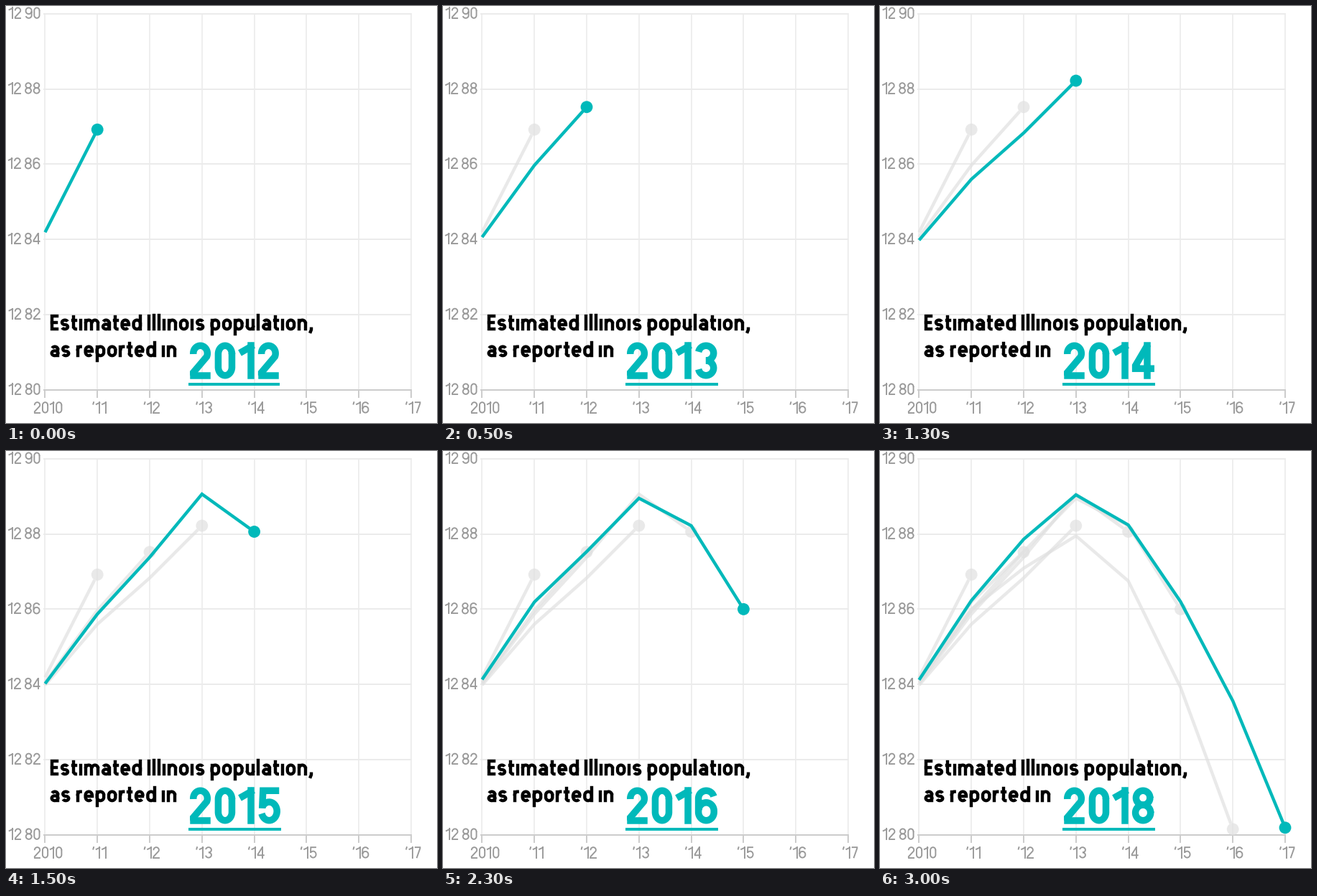
Recreate the animation shown at these times as a matplotlib script. Size 600 px wide and 581 px high, loop 3.5 s.

```python
import numpy as np
import matplotlib.pyplot as plt
from matplotlib.animation import FuncAnimation
from matplotlib.collections import LineCollection
from matplotlib.patches import Circle

W, H, DPI = 600, 581, 100
PX = 72 / DPI
TEAL, GRID, AXIS, LABEL = "#00b9ba", "#ebebeb", "#cccccc", "#999999"
LEFT, STEP_X = 54.4, 72.8
BOTTOM, STEP_Y = 534.8, 104.8
DOT = 8.4

# Population estimates per report, in thousands above 12.80 million
REPORTS = {
    2012: [41.9, 69.2],
    2013: [40.6, 59.7, 75.2],
    2014: [39.8, 56.0, 68.3, 82.2],
    2015: [40.2, 58.7, 73.8, 90.6, 80.6],
    2016: [41.3, 61.9, 75.3, 89.5, 82.2, 60.0],
    2017: [41.5, 60.0, 70.9, 79.5, 67.5, 39.2, 1.5],
    2018: [41.2, 62.3, 78.6, 90.4, 82.4, 62.0, 35.6, 1.9],
}


# Condensed stroke lettering: glyphs live in a unit box, baseline 0, capitals 1

def arc(cx, cy, rx, ry, start, end):
    a = np.radians(np.linspace(start, end, 28))
    return list(zip(cx + rx * np.cos(a), cy + ry * np.sin(a)))


def ring(low, high, r, inset=0):
    rx = 0.5 - inset
    pts = arc(0.5, high - r, rx, r, 0, 180) + arc(0.5, low + r, rx, r, 180, 360)
    return pts + pts[:2]


def stem(x, low, high):
    return [(x, low), (x, high)]


def bar(y, left=0, right=1):
    return [(left, y), (right, y)]


XH = 0.67
BOWL = ring(0, XH, 0.25)
ARCH = arc(0.5, XH - 0.25, 0.5, 0.25, 180, 0)
SIX = (arc(0.5, 0.74, 0.5, 0.26, 15, 180) + arc(0.5, 0.28, 0.5, 0.28, 180, 360)
       + arc(0.5, 0.32, 0.5, 0.28, 0, 170))

# Each glyph: width relative to capital height (0 = one stroke wide), strokes
GLYPHS = {
    " ": (0.13, []),
    ".": (0, [stem(0, 0, 0.01)]),
    ",": (0.24, [[(1, 0.02), (1, -0.05), (0, -0.2)]]),
    "‘": (0.16, [[(1, 1), (0, 0.83)]]),
    "0": (0.56, [ring(0, 1, 0.28)]),
    "1": (0.40, [stem(1, 0, 1), [(0, 0.81), (1, 0.96)]]),
    "2": (0.57, [arc(0.5, 0.74, 0.5, 0.26, 185, -25) + [(0, 0.1), (0, 0)], bar(0)]),
    "3": (0.60, [arc(0.5, 0.75, 0.5, 0.25, 170, -90)
                 + arc(0.5, 0.25, 0.5, 0.25, 90, -170)]),
    "4": (0.61, [stem(0.75, 0, 1), [(0.7, 0.95), (0, 0.33), (0, 0.23), (1, 0.23)]]),
    "5": (0.61, [[(0.92, 1), (0.1, 1), (0.06, 0.52)],
                 arc(0.5, 0.31, 0.5, 0.31, 145, -165)]),
    "6": (0.61, [SIX]),
    "7": (0.52, [[(0, 1), (1, 1), (1, 0.9), (0.32, 0.02)]]),
    "8": (0.60, [ring(0.52, 1, 0.24, 0.04), ring(0, 0.52, 0.26)]),
    "9": (0.61, [[(1 - x, 1 - y) for x, y in SIX]]),
    "E": (0.51, [[(1, 1), (0, 1), (0, 0), (1, 0)], bar(0.5, 0, 0.85)]),
    "I": (0, [stem(0, 0, 1)]),
    "a": (0.565, [stem(1, 0, 0.44), arc(0.5, 0.45, 0.5, 0.22, 0, 150),
                  ring(0, 0.36, 0.18)]),
    "d": (0.60, [BOWL, stem(1, 0, 1)]),
    "e": (0.585, [arc(0.5, 0.25, 0.5, 0.25, 320, 180) + ARCH + [(1, 0.34)], bar(0.34)]),
    "i": (0, [stem(0, 0, XH - 0.01), stem(0, 1.03, 1.04)]),
    "l": (0, [stem(0, 0, 1.02)]),
    "m": (0.94, [stem(0, 0, XH), stem(0.5, 0, 0.42), stem(1, 0, 0.42),
                 arc(0.25, 0.43, 0.25, 0.24, 180, 0),
                 arc(0.75, 0.43, 0.25, 0.24, 180, 0)]),
    "n": (0.58, [stem(0, 0, XH), stem(1, 0, 0.42), ARCH]),
    "o": (0.595, [BOWL]),
    "p": (0.60, [BOWL, stem(0, -0.36, XH)]),
    "r": (0.37, [stem(0, 0, XH), arc(0.9, 0.37, 0.9, 0.3, 180, 90) + [(1.5, XH)]]),
    "s": (0.54, [arc(0.5, 0.5, 0.5, 0.17, 22, 270)
                 + arc(0.5, 0.165, 0.5, 0.165, 90, -158)]),
    "t": (0.37, [stem(0.35, 0.16, 0.9), bar(XH),
                 arc(1, 0.18, 0.65, 0.18, 180, 270) + [(1.5, 0)]]),
    "u": (0.58, [stem(0, 0.25, XH), stem(1, 0, XH), arc(0.5, 0.25, 0.5, 0.25, 180, 360)]),
}


def letter(text, x, base, size, weight, color, align=0.0):
    """Draw text; align 0 is left, 0.5 centre, 1 right. Return artists and end x."""
    gap = 0.11 * size
    widths = [GLYPHS[c][0] * size or weight for c in text]
    total = sum(widths) + gap * (len(text) - 1)
    x -= align * total
    end = x + total
    straight, curved = [], []
    for c, w in zip(text, widths):
        for stroke in GLYPHS[c][1]:
            u, v = np.array(stroke).T
            pts = np.column_stack([x + weight / 2 + u * (w - weight),
                                   base - weight / 2 - v * (size - weight)])
            (curved if len(stroke) > 8 else straight).append(pts)
        x += w + gap
    artists = []
    for strokes, cap in ((straight, "projecting"), (curved, "butt")):
        lines = LineCollection(strokes, colors=color, linewidths=weight * PX,
                               capstyle=cap, joinstyle="miter", zorder=5)
        artists.append(ax.add_collection(lines))
    return artists, end


def rule(xs, ys, color, width, **kw):
    return ax.plot(xs, ys, color=color, lw=width * PX, solid_capstyle="butt",
                   solid_joinstyle="miter", **kw)[0]


def curve(values):
    n = np.arange(len(values))
    return np.column_stack([LEFT + STEP_X * n,
                            BOTTOM - np.array(values) * STEP_Y / 20])


def draw_grid():
    right, top = LEFT + 7 * STEP_X, BOTTOM - 5 * STEP_Y
    for i in range(8):
        x = LEFT + STEP_X * i
        rule([x, x], [top, BOTTOM], "#eeeeee", 2, zorder=1)
        rule([x, x], [BOTTOM, 546], AXIS, 2, zorder=1)
        name, shift = (f"‘{10 + i}", 2.8) if i else ("2010", 4.2)
        letter(name, x + shift, 567.5, 16.3, 1.9, LABEL, 0.5)
    for i in range(6):
        y = BOTTOM - STEP_Y * i
        rule([52, right + 1], [y, y], GRID if i else AXIS, 2, zorder=1.5)
        letter(f"{12.8 + 0.02 * i:.2f}", 47.5, y + 7, 16.3, 1.9, LABEL, 1)


def draw_past(values):
    pts = curve(values)
    tip = pts[-1].copy()
    back = pts[-2] - tip
    pts[-1] = tip + back * DOT / np.hypot(*back)
    line = rule(*pts.T, "#e0e0e0", 4.4, alpha=0.7, zorder=2)
    dot = Circle(tip, DOT, fc="#e0e0e0", ec="none", alpha=0.7, zorder=2)
    return [line, ax.add_patch(dot)]


def draw_current(year, values):
    pts = curve(values)
    line = rule(*pts.T, TEAL, 4.4, zorder=6)
    dot = ax.add_patch(Circle(pts[-1], DOT, fc=TEAL, ec="none", zorder=6))
    digits, end = letter(str(year), 256, 519.5, 51, 9.5, TEAL)
    underline = rule([254, end + 1.2], [527, 527], TEAL, 4, zorder=5)
    return [line, dot, underline] + digits


fig = plt.figure(figsize=(W / DPI, H / DPI), dpi=DPI, facecolor="white")
ax = fig.add_axes([0, 0, 1, 1])
ax.set_xlim(0, W)
ax.set_ylim(H, 0)
ax.set_autoscale_on(False)
ax.axis("off")

draw_grid()
letter("Estimated Illinois population,", 61.5, 452.3, 23, 4.4, "black")
letter("as reported in", 61.5, 489.3, 23, 4.4, "black")
past = [draw_past(v) for v in REPORTS.values()]
current = [draw_current(y, v) for y, v in REPORTS.items()]


def update(n):
    for i, (old, new) in enumerate(zip(past, current)):
        for artist in old:
            artist.set_visible(i < n)
        for artist in new:
            artist.set_visible(i == n)
    return []


anim = FuncAnimation(fig, update, frames=len(REPORTS), interval=500,
                     init_func=lambda: update(0), repeat=True, repeat_delay=0)
plt.show()
```
